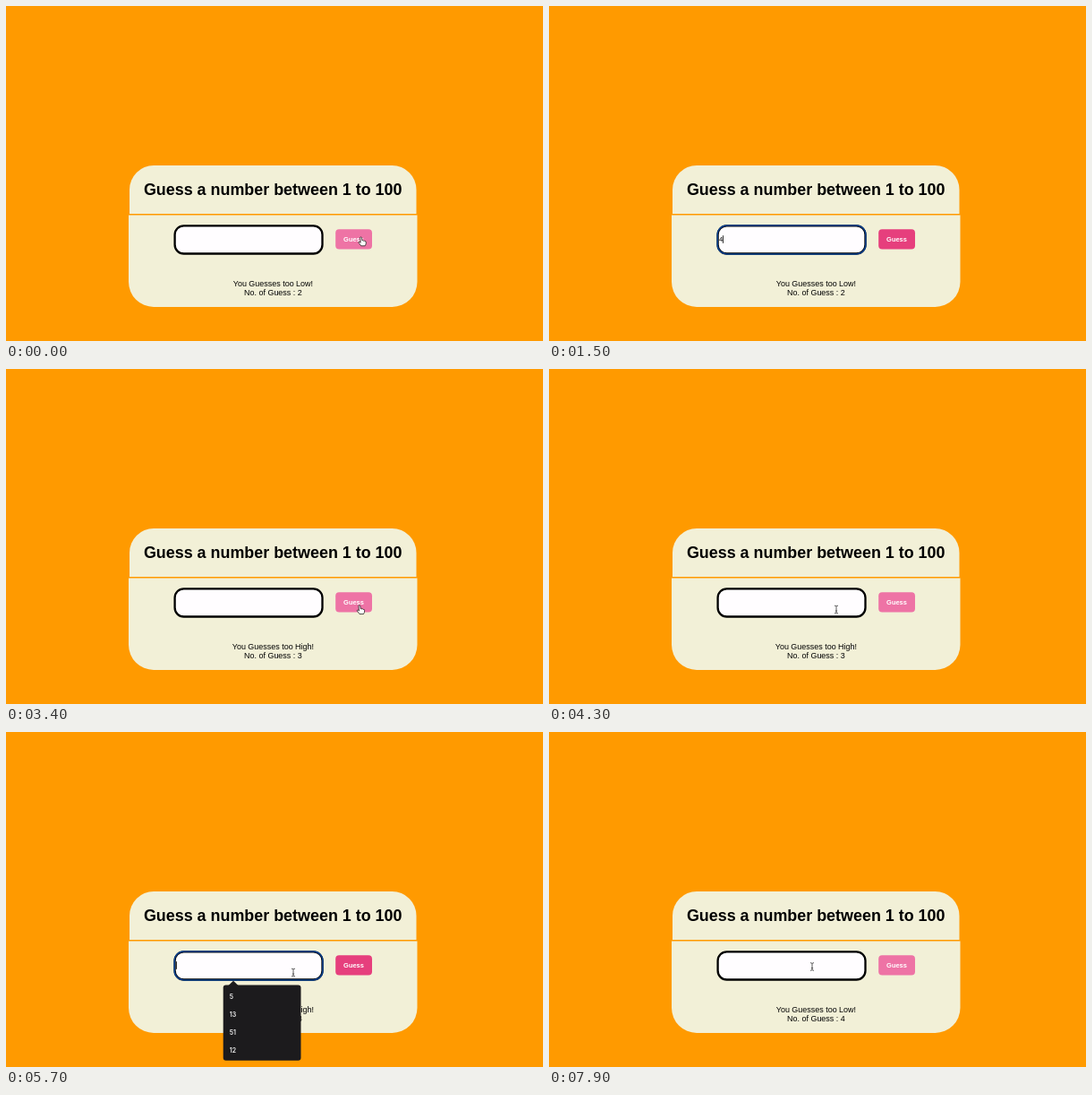
An HTML page for the animation above (8 s loop, 600x374 px).

```html
<!DOCTYPE html>
<html lang="en">
<head>
<meta charset="utf-8">
<title>Guess a number</title>
<style>
  html, body { margin: 0; width: 100%; height: 100%; overflow: hidden; background: #ff9a00; }
  svg { display: block; width: 100vw; height: 100vh; }
  text { font-family: "Liberation Sans", Arial, sans-serif; }
  .title { font-size: 17.92px; font-weight: 700; }
  .note { font-size: 8.96px; }
  .small { font-size: 7.47px; }
  .mid { text-anchor: middle; }
  #list text { font: 600 7px Inter, sans-serif; fill: #f4f4f4; }
</style>
</head>
<body>
<svg viewBox="0 0 600 374">
  <rect width="600" height="374" fill="#ff9a00"/>
  <g fill="#f2f0d7">
    <path d="M138 232V205a27 27 0 0 1 27-27H431.500a27 27 0 0 1 27 27V232Z"/>
    <path d="M137 233.500H459.500V308a28 28 0 0 1-28 28H165a28 28 0 0 1-28-28Z"/>
  </g>
  <text class="title mid" x="298.200" y="211.300">Guess a number between 1 to 100</text>

  <rect x="188.600" y="245.300" width="164.900" height="31.200" rx="10" fill="#fffdff" stroke="#000" stroke-width="2.300"/>
  <rect id="ring" x="188.200" y="244.900" width="165.700" height="32" rx="10.500" fill="none" stroke="#07408f" stroke-width="1.500"/>
  <text id="value" class="small" x="190" y="263.200"></text>
  <rect id="caret" y="256.200" width=".8" height="8.600"/>

  <rect id="button" x="368.200" y="249.200" width="40.800" height="22.200" rx="4"/>
  <text class="small mid" x="388.500" y="263.100" fill="#fff" font-weight="700">Guess</text>

  <text id="hint" class="note mid" x="298.400" y="313"></text>
  <text id="count" class="note mid" x="298.400" y="323.200"></text>

  <g id="list">
    <path d="M248.500 283L254 277.800L259.500 283Z" fill="#1c1b1d"/>
    <rect x="242.700" y="282.500" width="86.800" height="84.300" rx="3" fill="#1c1b1d"/>
  </g>

  <g id="pointer">
    <path id="hand" fill="#fff" stroke="#222" stroke-width=".8" stroke-linejoin="round"
      d="M-.9 .4Q0-.5 .9 .4L1.500 4Q2.400 3.200 3 4.200Q4 3.500 4.500 4.700Q5.800 4.300 5.800 5.700Q6 8 4.700 9.800H.2Q-.9 8-2.600 6.200Q-2.700 5.100-1.500 5.300L-.3 6.200Z"/>
    <path id="beam" fill="none" stroke="#333" stroke-width=".8" d="M-2-4.300Q0-4.300 0-3.300Q0-4.300 2-4.300M0-3.300V3.300M-2 4.300Q0 4.300 0 3.300Q0 4.300 2 4.300M-1.100 1.600H1.100"/>
    <path id="arrow" fill="#000" stroke="#fff" stroke-width=".6" d="M0 0V9L2.100 7.100L3.500 10.200L4.900 9.600L3.500 6.600H6.300Z"/>
  </g>
</svg>
<script>
const LOOP = 8000, STEP = 100;
const $ = id => document.getElementById(id);
const show = (id, on) => $(id).setAttribute("visibility", on ? "visible" : "hidden");
const within = (x, a, b) => x >= a && x < b;
const clamp = x => Math.max(0, Math.min(1, x));

["5", "13", "51", "12"].forEach((label, i) => {
  const item = document.createElementNS("http://www.w3.org/2000/svg", "text");
  item.setAttribute("x", 249.700);
  item.setAttribute("y", 297.700 + 20 * i);
  item.textContent = label;
  $("list").append(item);
});

// Two rounds: focus the field, type two digits, press the button.
const rounds = [
  { focus: 700, open: 800, keys: [1200, 1900], text: "40", move: 2000, press: 3000 },
  { focus: 4500, open: 4600, keys: [5800, 6000], text: "30", move: 6100, press: 7000 }
];
const results = ["Low", "High", "Low"];

// Pointer stops: time, x, y
const path = [
  [0, 396.5, 258], [500, 336, 263], [2000, 336, 263], [2500, 394.800, 263.800],
  [3400, 394.800, 263.800], [3900, 321, 268.500], [6100, 321, 268.500],
  [6500, 407.500, 258], [7200, 407.500, 258], [7900, 294, 262], [8000, 294, 262]
];

function pointerAt(t) {
  const i = path.findIndex(p => p[0] > t);
  const [t0, x0, y0] = path[i - 1], [t1, x1, y1] = path[i];
  const k = (t - t0) / (t1 - t0), e = k * k * (3 - 2 * k);
  return [x0 + (x1 - x0) * e, y0 + (y1 - y0) * e];
}

function draw(t) {
  const round = rounds.find(r => within(t, r.focus, r.press));
  const typed = round ? round.keys.filter(k => t >= k).length : 0;
  const done = rounds.filter(r => t >= r.press).length;

  $("value").textContent = round ? round.text.slice(0, typed) : "";
  $("hint").textContent = `You Guesses too ${results[done]}!`;
  $("count").textContent = `No. of Guess : ${2 + done}`;
  show("ring", round);

  const since = round ? t - (typed ? round.keys[typed - 1] : round.focus) : 0;
  show("caret", round && since % 1000 < 500);
  $("caret").setAttribute("x", 190 + 4.150 * typed);

  const fade = round && t >= round.open ? 1 - clamp((t - round.keys[0]) / 200) : 0;
  $("list").setAttribute("opacity", fade);

  const [x, y] = pointerAt(t);
  const onButton = within(x, 368, 409) && within(y, 249, 271.5);
  const onField = within(x, 188, 354) && within(y, 244, 277.5);
  const visible = !(round && within(t, round.keys[0], round.move));
  $("pointer").setAttribute("transform", `translate(${x} ${y})`);
  show("hand", visible && onButton);
  show("beam", visible && onField);
  show("arrow", visible && !onButton && !onField);

  // The button stays light while it keeps the focus.
  $("button").setAttribute("fill", !round || onButton ? "#ee73a5" : "#e63f7d");
}

const start = performance.now();
function tick() {
  const t = (performance.now() - start) % LOOP;
  draw(Math.floor(t / STEP) * STEP);
  requestAnimationFrame(tick);
}
tick();
</script>
</body>
</html>
```
